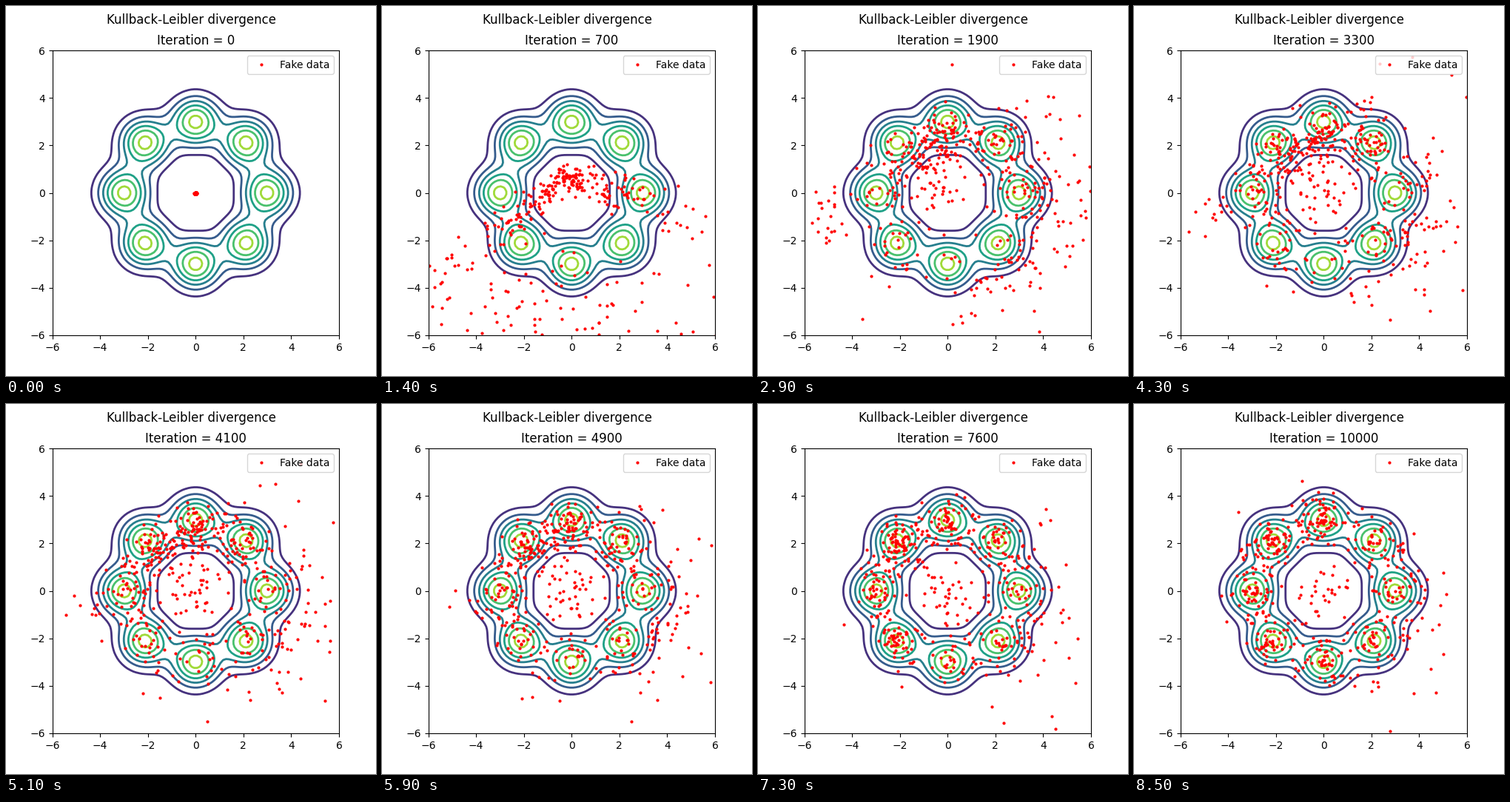
These frames come from a looping animation (500 px wide and 500 px high, 8.6 s). A matplotlib script:

```python
import numpy as np
import matplotlib.pyplot as plt
from matplotlib.animation import FuncAnimation

N = 500
FRAMES = 86
EARLY = 14
FIRST_RING = 29
rng = np.random.default_rng(7)


def polar(r, a):
    return np.column_stack([r * np.cos(a), r * np.sin(a)])


def early_cloud():
    """Two arms leaving a dense knot, above a wide cloud below the axes."""
    n = N // 2
    x = -0.4 + rng.laplace(0, 1.9, n)
    y = np.interp(x, [-6, -2, -0.4, 1, 3, 4, 6], [-3.2, -0.8, 0.6, 0.4, 0, -0.9, -2.4])
    arms = np.column_stack([x, y + rng.normal(0, 0.3 + 0.07 * abs(x))])
    low = rng.normal([-1, -6.5], [5, 2.6], (N - n, 2))
    return np.vstack([arms, low])


def ring_cloud(t):
    """Samples gathering on the ring of modes; t runs from 0 to 1."""
    late = (1 - t) ** 2
    centre = rng.normal(0, 0.75, (int(32 + 15 * np.sin(np.pi * t)), 2))

    n = int(45 + 120 * late)
    strays = polar(3.6 + rng.exponential(1.7 - 0.9 * t, n), rng.normal(-0.35, 0.7, n))
    left = rng.normal([-4.8, -0.9], [0.6, 0.7], (int(25 * late), 2))

    n = N - len(centre) - len(strays) - len(left)
    a = rng.vonmises(1.75 + 0.6 * t, 1 - 0.6 * t, n)
    a -= (0.3 + 0.4 * t) * np.sin(8 * a) / 8
    pull = 0.7 * (1 - t) * np.maximum(0, np.cos(a - 2.1))
    ring = polar(3 - pull + rng.normal(0, 0.6 - 0.12 * t, n), a)
    return np.vstack([centre, strays, left, ring])


def transport(pts, goal, steps=200):
    """Move pts onto the distribution of goal by sliced matching."""
    pts = pts.copy()
    for _ in range(steps):
        a = rng.uniform(0, np.pi)
        for b in (a, a + np.pi / 2):
            d = np.array([np.cos(b), np.sin(b)])
            p = pts @ d
            order = np.argsort(p)
            shift = np.empty(N)
            shift[order] = np.sort(goal @ d) - p[order]
            pts += shift[:, None] * d
    return pts


start = early_cloud()
keys = [0, EARLY, *range(FIRST_RING, FRAMES, 14)]
poses = [start * 0.004, start]
for t in np.linspace(0, 1, len(keys) - 2):
    poses.append(transport(poses[-1], ring_cloud(t)))


def positions(i):
    k = min(np.searchsorted(keys, i, side="right") - 1, len(keys) - 2)
    u = (i - keys[k]) / (keys[k + 1] - keys[k])
    if k == 0:
        u = u * (2 - u)
    return poses[k] * (1 - u) + poses[k + 1] * u


def iteration(i):
    return 50 * min(i, 20) + 100 * np.clip(i - 20, 0, 40) + 200 * max(i - 60, 0)


def density(x, y):
    total = np.zeros_like(x)
    for a in np.arange(8) * np.pi / 4:
        d2 = (x - 3 * np.cos(a)) ** 2 + (y - 3 * np.sin(a)) ** 2
        total += np.exp(-d2) / np.pi
    return total


fig, ax = plt.subplots(figsize=(5, 5), dpi=100)
fig.suptitle("Kullback-Leibler divergence")
axis = np.linspace(-6, 6, 100)
gx, gy = np.meshgrid(axis, axis)
ax.contour(gx, gy, density(gx, gy), levels=np.arange(8) * 0.05,
           cmap="viridis", vmin=0, vmax=0.35, linewidths=2)
dots, = ax.plot([], [], "r.", markersize=4, label="Fake data", zorder=2.2)
ax.set_xlim(-6, 6)
ax.set_ylim(-6, 6)
ax.legend(loc="upper right")
title = ax.set_title("Iteration = 0")


def update(i):
    dots.set_data(*positions(i).T)
    title.set_text(f"Iteration = {iteration(i)}")
    return dots, title


anim = FuncAnimation(fig, update, frames=FRAMES, init_func=lambda: update(0),
                     interval=100, repeat=True, repeat_delay=0, blit=False)
plt.show()
```
